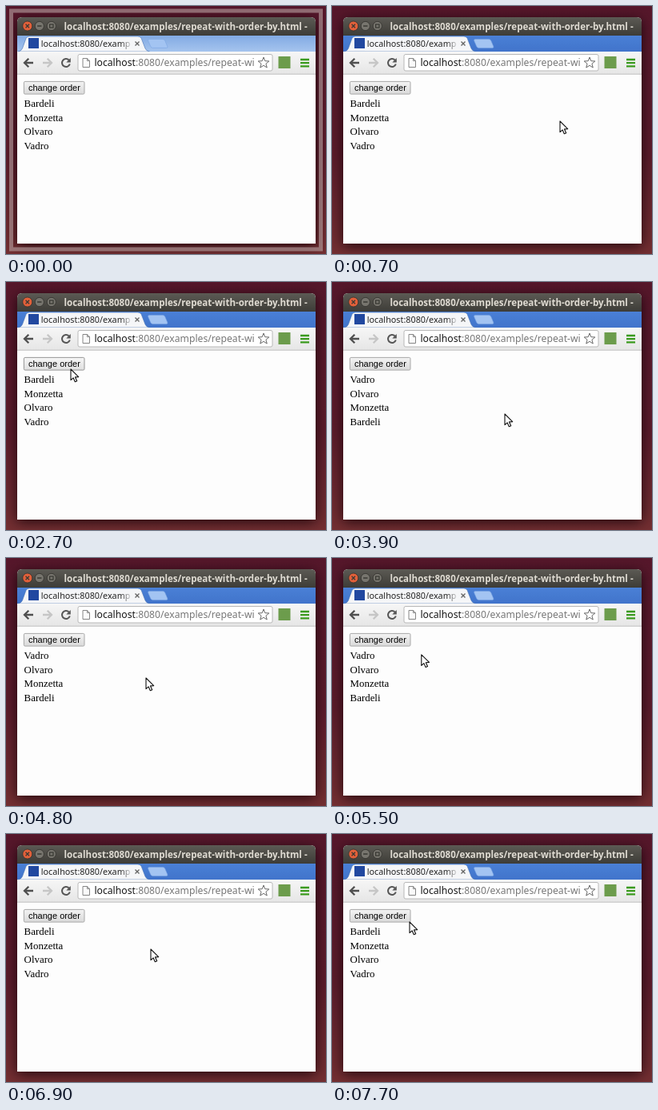
An HTML page that plays this animation: 400x310 px, repeating every 8000 ms.

```html
<!DOCTYPE html>
<html lang="en">
<head>
<meta charset="utf-8">
<title>Ordered list demo</title>
<style>
  html, body { margin: 0; width: 100%; height: 100%; overflow: hidden; background: #54172a; }
  svg { display: block; width: 400px; height: 310px; }
  text { white-space: pre; }
  .ui { font-family: "Noto Sans", "Open Sans", sans-serif; }
  .page { font: 12.9px "Liberation Serif", "Times New Roman", serif; fill: #000; }
  .btn { font: 11px "Liberation Sans", Arial, sans-serif; fill: #000; }
  .window { filter: drop-shadow(0 3px 8px rgba(15, 0, 5, .8)); }
</style>
</head>
<body>
<svg viewBox="0 0 400 310" xmlns="http://www.w3.org/2000/svg">
  <defs>
    <linearGradient id="desk" x2="0" y2="1">
      <stop offset="0" stop-color="#56172b"/>
      <stop offset=".6" stop-color="#5b1c2b"/>
      <stop offset="1" stop-color="#732f32"/>
    </linearGradient>
    <linearGradient id="title" x2="0" y2="1">
      <stop offset="0" stop-color="#5c5a54"/>
      <stop offset="1" stop-color="#3d3c37"/>
    </linearGradient>
    <linearGradient id="strip" x2="0" y2="1">
      <stop offset="0" stop-color="#4a80d6"/>
      <stop offset="1" stop-color="#4174cb"/>
    </linearGradient>
    <linearGradient id="stripDim" x2="0" y2="1">
      <stop offset="0" stop-color="#82aae3"/>
      <stop offset="1" stop-color="#a5c4ee"/>
    </linearGradient>
    <linearGradient id="bar" x2="0" y2="1">
      <stop offset="0" stop-color="#f6f6f6"/>
      <stop offset="1" stop-color="#e6e6e6"/>
    </linearGradient>
    <linearGradient id="faceUp" x2="0" y2="1">
      <stop offset="0" stop-color="#f3f3f3"/>
      <stop offset="1" stop-color="#dadada"/>
    </linearGradient>
    <linearGradient id="faceHover" x2="0" y2="1">
      <stop offset="0" stop-color="#f6f6f6"/>
      <stop offset="1" stop-color="#e0e0e0"/>
    </linearGradient>
    <linearGradient id="faceDown" x2="0" y2="1">
      <stop offset="0" stop-color="#d4d4d4"/>
      <stop offset="1" stop-color="#e8e8e8"/>
    </linearGradient>
    <linearGradient id="fade" gradientUnits="userSpaceOnUse" x1="143" x2="157" y1="0" y2="0">
      <stop offset="0" stop-color="#222"/>
      <stop offset="1" stop-color="#222" stop-opacity=".1"/>
    </linearGradient>
    <clipPath id="tabClip"><rect x="40" y="37" width="115" height="20"/></clipPath>
    <clipPath id="urlClip"><rect x="106" y="60" width="206" height="21"/></clipPath>
  </defs>

  <rect width="400" height="310" fill="url(#desk)"/>

  <g class="window">
    <path d="M14 297V20q0-6 6-6H381q6 0 6 6V297Z" fill="#fdfdfd"/>
  </g>

  <!-- title bar -->
  <path d="M14 37V20q0-6 6-6H381q6 0 6 6V37Z" fill="url(#title)"/>
  <g stroke="#33322e" stroke-width=".8">
    <circle cx="26.8" cy="25" r="6" fill="#e2603a"/>
    <circle cx="41.8" cy="25" r="5.6" fill="#77756e"/>
    <circle cx="56.8" cy="25" r="5.6" fill="#77756e"/>
  </g>
  <g fill="none" stroke="#3a3934" stroke-width="1.3">
    <path d="M24.6 22.8l4.4 4.4m0-4.4l-4.4 4.4M39.1 25h5.4"/>
    <rect x="54.6" y="23" width="4.4" height="4"/>
  </g>
  <text class="ui" x="72.5" y="29.6" font-size="11.55" font-weight="700" fill="#dfdbd2">localhost:8080/examples/repeat-with-order-by.html -</text>

  <!-- tabs -->
  <rect id="tabs" x="14" y="37" width="373" height="20"/>
  <path d="M179 41.5H196q2 0 2.8 2l3 7q.7 1.9-1.2 1.9H183.500q-2 0-2.8-2l-3-7q-.6-1.9 1.3-1.9Z" fill="#a3c4f2" stroke="#7ba5e2" stroke-width=".6"/>
  <path d="M15 57q4-.5 5.5-4L25 40.5q1.2-2.5 4-2.5H165q3 0 4.2 2.5L174 53q1.5 3.5 5.5 4Z" fill="#f5f6f8" stroke="#4471b4" stroke-width=".6"/>
  <rect x="28" y="40" width="13" height="13" fill="#2148a0"/>
  <g clip-path="url(#tabClip)">
    <text class="ui" x="43.8" y="50.7" font-size="10.8" fill="url(#fade)">localhost:8080/examples</text>
  </g>
  <path d="M161.500 44.500l5 5m0-5l-5 5" stroke="#666" stroke-width="1.4"/>

  <!-- toolbar -->
  <rect x="14" y="57" width="373" height="28" fill="url(#bar)"/>
  <path d="M14 85.2H387" stroke="#b8b8b8" stroke-width=".9"/>
  <g fill="none" stroke-width="2.3">
    <path d="M34 71H23.5M28.3 65.7L23 71l5.3 5.3" stroke="#505050"/>
    <path d="M46 71H56.5M51.7 65.7L57 71l-5.3 5.3" stroke="#c6c6c6"/>
    <path d="M78.6 67.5A5 5 0 1 0 79.8 72.5" stroke="#555" stroke-width="2"/>
  </g>
  <path d="M80.8 65V70.5H75.3Z" fill="#555"/>
  <rect x="90" y="60.5" width="243" height="20.5" rx="2" fill="#fff" stroke="#b1b1b1" stroke-width=".9"/>
  <path d="M96 65.5H101.5L104.5 68.5V76.5H96ZM101.5 65.5V68.5H104.5" fill="#fafafa" stroke="#858585"/>
  <g clip-path="url(#urlClip)">
    <text class="ui" x="110.4" y="75.2" font-size="12.2" fill="#777"><tspan fill="#161616">localhost</tspan>:8080/examples/repeat-wi</text>
  </g>
  <path id="star" fill="#fff" stroke="#686868" stroke-linejoin="round"/>
  <rect x="340.5" y="63" width="15" height="15" fill="#6c9c4c"/>
  <path d="M368 67H379M368 71.2H379M368 75.4H379" stroke="#3a9a1d" stroke-width="2.3"/>

  <!-- page -->
  <rect id="button" x="22.4" y="94.4" width="75.6" height="15.7" rx="1.5" stroke-width=".9"/>
  <text class="btn" x="28" y="105.8">change order</text>
  <g id="list" class="page"></g>

  <rect id="flash" x="6.5" y="6" width="387" height="298" fill="none" stroke="#b9a4a4" stroke-opacity=".6" stroke-width="5"/>
  <path id="cursor" d="M0 0V13.6L3.1 10.8 5.3 15.8 7.7 14.7 5.5 9.9 9.7 9.6Z" fill="#fff" stroke="#111" stroke-width="1.1" stroke-linejoin="round"/>
</svg>

<script>
const LOOP = 8000, STEP = 100;
const names = ["Bardeli", "Monzetta", "Olvaro", "Vadro"];
const reversed = [...names].reverse();

// pointer path: time, x, y
const path = [
  [100, 368, 118], [400, 325, 131], [700, 285, 144], [900, 257, 151],
  [1200, 205, 146], [1500, 148, 134], [1800, 106, 124], [2000, 97, 121],
  [2200, 97, 121], [2500, 87, 114], [2700, 81, 109], [3100, 79, 102],
  [3600, 79, 102], [3700, 122, 124], [3800, 180, 150], [3900, 216, 165],
  [4100, 214, 164], [4500, 198, 157], [4800, 175, 150], [5400, 117, 125],
  [5900, 91, 104], [6200, 86, 99], [6400, 86, 99], [6600, 128, 122],
  [6800, 173, 141], [6900, 181, 144], [7100, 165, 140], [7300, 139, 133],
  [7500, 114, 121], [7700, 97, 110], [LOOP, 97, 110]
];

const $ = id => document.getElementById(id);

const rows = names.map((_, i) => {
  const row = document.createElementNS("http://www.w3.org/2000/svg", "text");
  row.setAttribute("x", 22.6);
  row.setAttribute("y", 126 + i * 17.7);
  return $("list").appendChild(row);
});

const points = Array.from({ length: 10 }, (_, i) => {
  const r = i % 2 ? 3.1 : 7.2, a = i * Math.PI / 5 - Math.PI / 2;
  return (322 + r * Math.cos(a)).toFixed(2) + " " + (71.2 + r * Math.sin(a)).toFixed(2);
});
$("star").setAttribute("d", "M" + points.join("L") + "Z");

function pointerAt(t) {
  const i = Math.max(1, path.findIndex(p => p[0] >= t));
  const [t0, x0, y0] = path[i - 1], [t1, x1, y1] = path[i];
  const k = Math.max(0, (t - t0) / (t1 - t0));
  return [x0 + (x1 - x0) * k, y0 + (y1 - y0) * k];
}

function draw(ms) {
  const t = Math.floor((ms % LOOP) / STEP) * STEP;
  const start = t < 100;
  const [x, y] = pointerAt(t);

  $("flash").style.display = start ? "" : "none";
  $("cursor").style.display = start ? "none" : "";
  $("cursor").setAttribute("transform", `translate(${x.toFixed(1)} ${y.toFixed(1)})`);
  $("tabs").setAttribute("fill", start ? "url(#stripDim)" : "url(#strip)");

  const hover = x > 22 && x < 98 && y > 94 && y < 110;
  const face = t === 3200 ? "faceDown" : hover ? "faceHover" : "faceUp";
  $("button").setAttribute("fill", `url(#${face})`);
  $("button").setAttribute("stroke", hover ? "#8c8c8c" : "#a0a0a0");

  const order = t >= 3300 && t < 6300 ? reversed : names;
  rows.forEach((row, i) => { row.textContent = order[i]; });
}

function tick() {
  draw(performance.now());
  requestAnimationFrame(tick);
}
tick();
</script>
</body>
</html>
```
